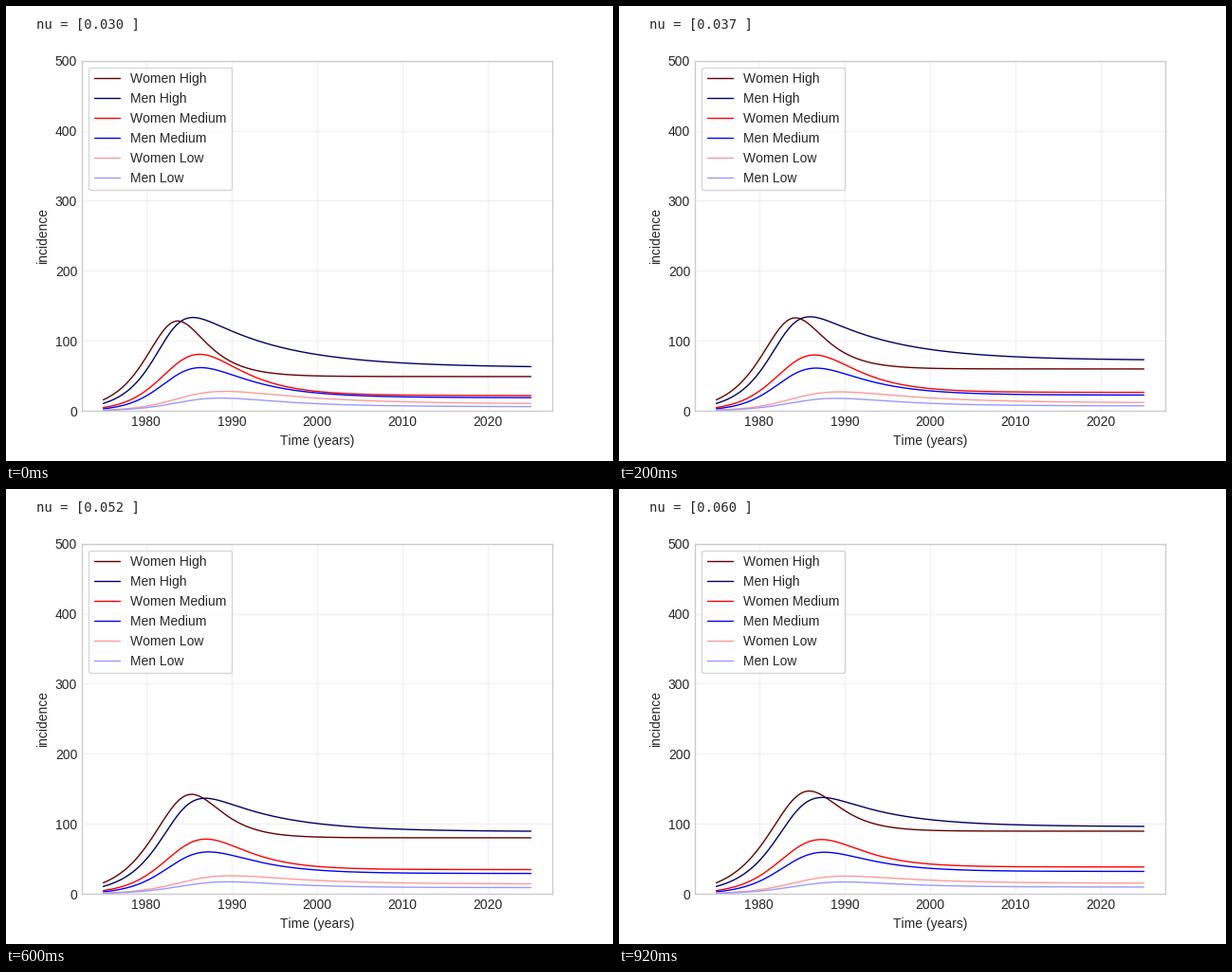
Recreate the animation shown at these times as a matplotlib script. Size 640x480 px, loop 1000 ms.

```python
import numpy as np
import matplotlib.pyplot as plt
from matplotlib.animation import FuncAnimation

plt.rcParams.update({
    "font.family": "Liberation Sans", "font.size": 10,
    "text.color": ".15", "axes.labelcolor": ".15",
    "xtick.color": ".15", "ytick.color": ".15",
    "axes.edgecolor": ".8", "axes.linewidth": 1, "axes.axisbelow": True,
    "xtick.major.size": 0, "ytick.major.size": 0,
    "lines.solid_capstyle": "round", "text.kerning_factor": 6,
})

NUS = np.linspace(0.03, 0.06, 5)
START, SPAN, DT = 1975, 50, 0.05
ELAPSED = np.arange(0, SPAN + DT / 2, DT)


class Group:
    """Susceptible pool refilled at rate nu and drained by a rising infection force."""

    def __init__(self, label, color, initial, capacity, force,
                 midpoint, delay, steepness=3.7, sharpness=1):
        self.label, self.color = label, color
        self.initial, self.capacity, self.force = initial, capacity, force
        self.midpoint, self.delay = midpoint, delay
        self.steepness, self.sharpness = steepness, sharpness

    def infection_force(self, nu):
        midpoint = self.midpoint + self.delay * (nu - NUS[0])
        growth = np.exp(self.steepness * (1 - ELAPSED / midpoint))
        return self.force * (1 + growth) ** (-1 / self.sharpness)

    def incidence(self, nu):
        force = self.infection_force(nu)
        pool = np.empty_like(ELAPSED)
        pool[0] = self.initial
        for i in range(len(pool) - 1):
            rate = nu + (force[i] + force[i + 1]) / 2
            rest = nu * self.capacity / rate
            pool[i + 1] = rest + (pool[i] - rest) * np.exp(-rate * DT)
        return force * pool


HIGH = dict(steepness=5.7, sharpness=2)
GROUPS = [
    Group("Women High", "#660000", 970, 1810, 0.283, 8.4, 63, **HIGH),
    Group("Men High", "#000066", 2500, 2900, 0.074, 8.05, 45, **HIGH),
    Group("Women Medium", "#ff0000", 1090, 850, 0.185, 9.1, 23),
    Group("Men Medium", "#0000ff", 926, 765, 0.14, 8.55, 28),
    Group("Women Low", "#ff9999", 750, 480, 0.068, 9.7, 20),
    Group("Men Low", "#9999ff", 381, 262, 0.1, 10.1, 25),
]

fig, ax = plt.subplots(figsize=(6.4, 4.8), dpi=100)
lines = [ax.plot([], [], color=g.color, lw=1, label=g.label)[0] for g in GROUPS]
ax.set(xlim=(1972.5, 2027.5), ylim=(0, 500),
       xticks=range(1980, 2021, 10), yticks=range(0, 501, 100),
       xlabel="Time (years)", ylabel="incidence")
ax.grid(color=".8", lw=1, alpha=0.25)
ax.legend(loc="upper left")
title = fig.text(0.05, 0.95, "", family="DejaVu Sans Mono")


def update(step):
    nu = NUS[step]
    title.set_text(f"nu = [{nu:.3f} ]")
    for line, group in zip(lines, GROUPS):
        line.set_data(START + ELAPSED, group.incidence(nu))
    return [title, *lines]


anim = FuncAnimation(fig, update, frames=len(NUS), interval=200, repeat=True)
plt.show()
```
